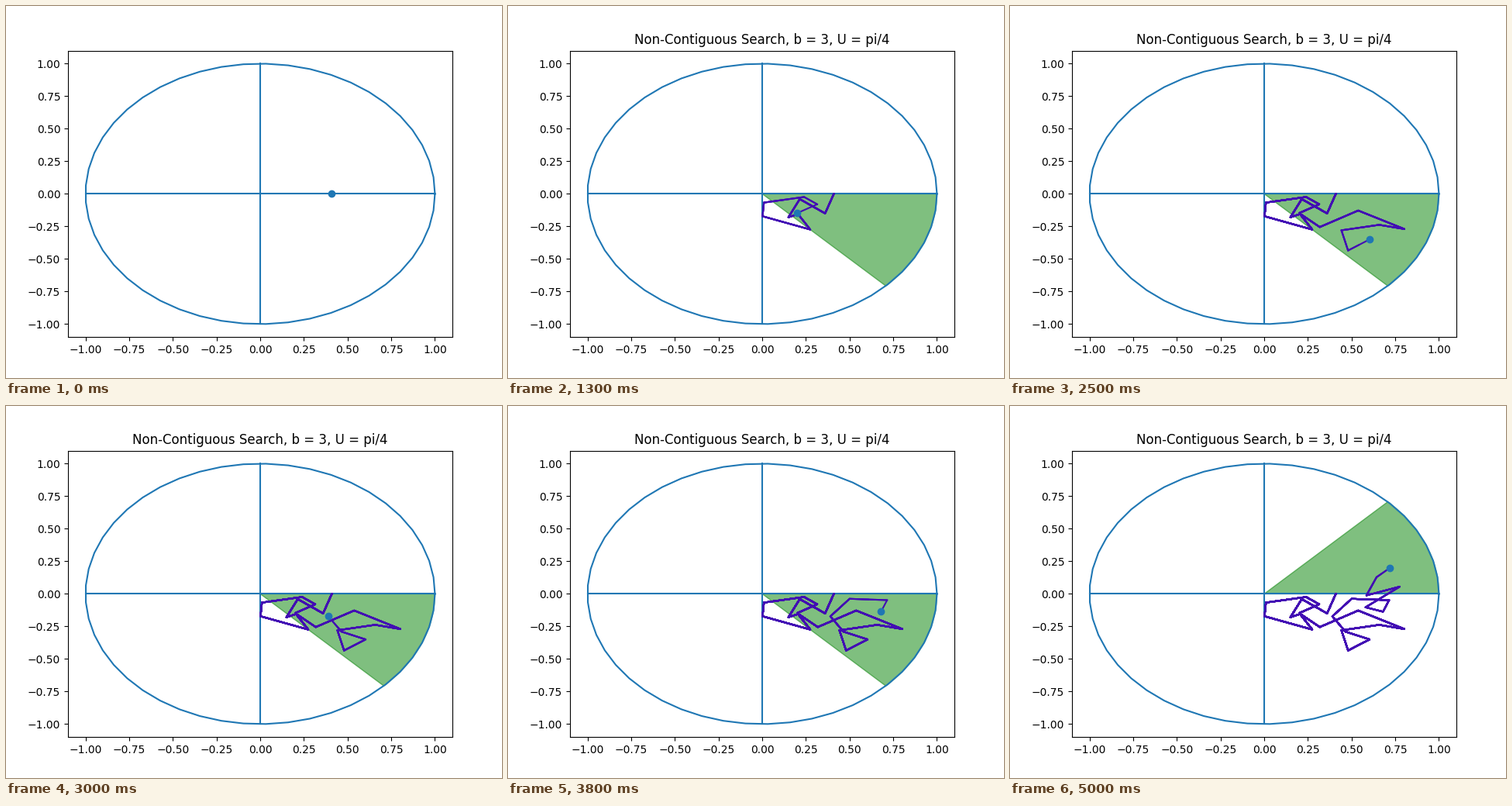
A matplotlib script that plays this animation: 640x480 px, repeating every 5100 ms.

```python
import numpy as np
import matplotlib.pyplot as plt
from matplotlib.animation import FuncAnimation
from matplotlib.patches import Wedge

STEPS = 51
SECTOR = 45
BLUE = "#1f77b4"
PURPLE = "#420db4"

# Main turns of the search as (step, x, y); steps between lie on straight legs
turns = np.array([
    (0, .41, 0), (1, .36, -.15), (2, .215, -.04), (3, .15, -.18),
    (4, .205, -.155), (7, .275, -.274), (8, .002, -.172), (9, .01, -.067),
    (11, .24, -.024), (12, .315, -.08), (13, .2, -.148), (16, .318, -.255),
    (18, .538, -.128), (19, .802, -.27), (20, .658, -.238), (22, .442, -.28),
    (23, .48, -.435), (25, .603, -.35), (26, .465, -.29), (30, .39, -.173),
    (35, .5, -.038), (37, .715, -.048), (38, .68, -.137), (41, .58, -.103),
    (42, .775, .055), (44, .585, -.012), (47, .643, .128), (50, .72, .2),
])
when, turn_x, turn_y = turns.T
steps = np.arange(STEPS)
xs = np.interp(steps, when, turn_x)
ys = np.interp(steps, when, turn_y)

fig, ax = plt.subplots(figsize=(6.4, 4.8), dpi=100)
ax.set(xlim=(-1.1, 1.1), ylim=(-1.1, 1.1))
title = ax.set_title("")

angle = np.linspace(0, 2 * np.pi, 50)
for x, y in [(np.cos(angle), np.sin(angle)), ([-1, 1], [0, 0]), ([0, 0], [-1, 1])]:
    ax.plot(x, y, color=BLUE)

wedge = ax.add_patch(Wedge((0, 0), 1, -SECTOR, 0, color="green", alpha=0.5))
# Every step strokes the whole trail again, so older legs grow heavier
strokes = [ax.plot([], [], color=PURPLE)[0] for _ in steps]
dot = ax.scatter([xs[0]], [ys[0]], color=BLUE, zorder=3)


def draw(step):
    start = SECTOR * np.floor(np.degrees(np.arctan2(ys[step], xs[step])) / SECTOR)
    wedge.set_theta1(start)
    wedge.set_theta2(start + SECTOR)
    wedge.set_visible(step > 0)
    title.set_text("Non-Contiguous Search, b = 3, U = pi/4" if step else "")
    for end, line in enumerate(strokes):
        line.set_data(xs[:end + 1], ys[:end + 1])
        line.set_visible(end <= step)
    dot.set_offsets([(xs[step], ys[step])])
    return [wedge, title, dot, *strokes]


anim = FuncAnimation(fig, draw, frames=STEPS, interval=100, repeat=True,
                     repeat_delay=0, init_func=lambda: draw(0), blit=False)
plt.show()
```
